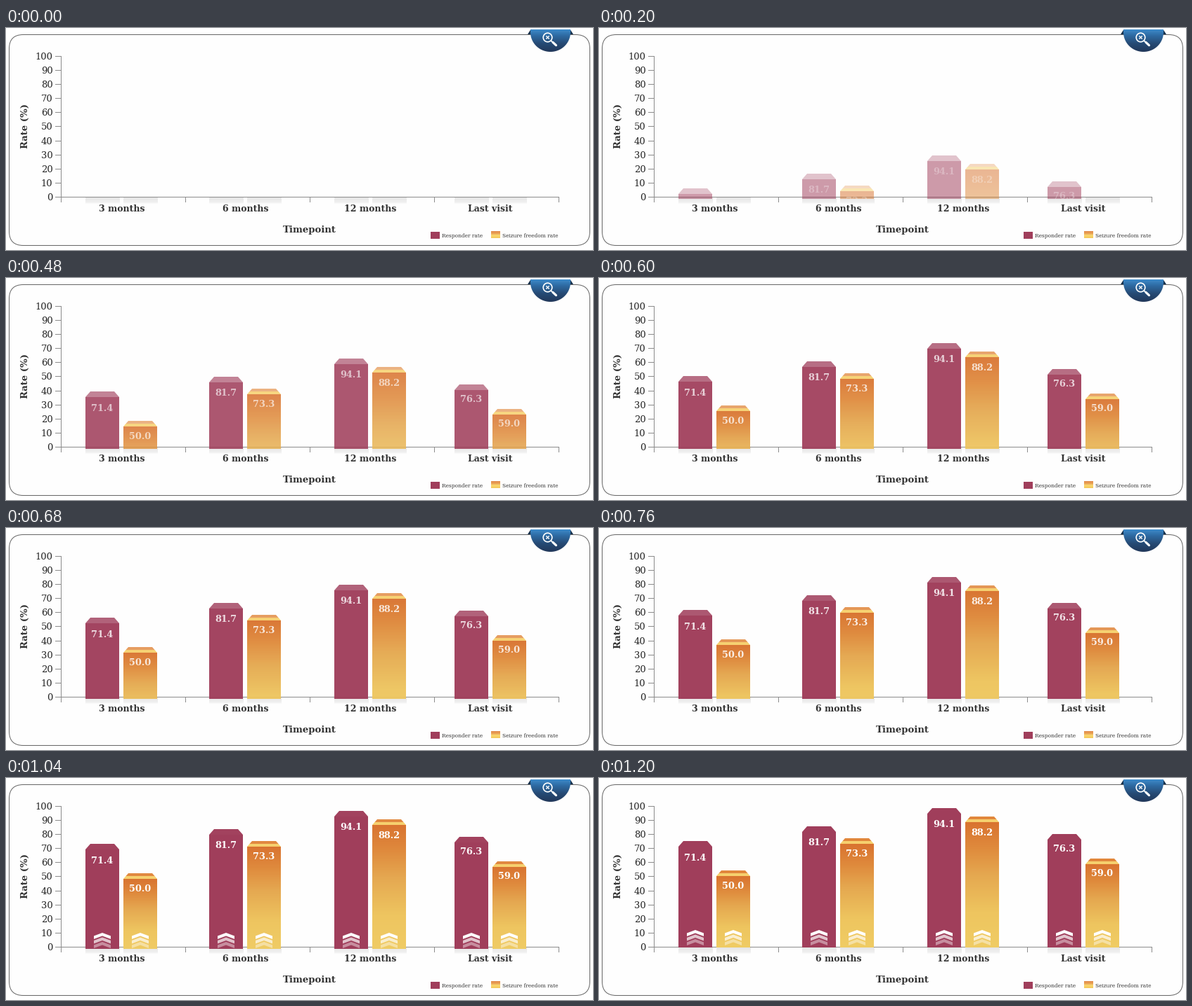
A matplotlib script for the animation above (8000 ms loop, 835 px wide and 317 px high).

```python
import numpy as np
import matplotlib.pyplot as plt
from matplotlib.animation import FuncAnimation
from matplotlib.patches import Circle, FancyBboxPatch, PathPatch, Polygon, Rectangle
from matplotlib.path import Path
from matplotlib.transforms import Affine2D

W, H, DPI = 835, 317, 100
STEP, LOOP, RISE = 40, 8000, 1200
DROP = 200          # how far below their place the bars start
FLOOR = 244         # bars are hidden below this line
BASE = 242
AXIS = 241.5
CAP = 8
BAR_W = 48

WINE = (160, 62, 91)
GOLD = [(0, (217, 115, 48)), (.2, (223, 138, 60)), (.42, (229, 168, 80)),
        (.72, (238, 197, 95)), (1, (240, 204, 100))]
LEGEND_GOLD = [(0, (226, 138, 76)), (.35, (234, 162, 84)),
               (.6, (250, 218, 112)), (1, (244, 198, 88))]
BLUE = [(0, (62, 142, 207)), (.3, (46, 106, 162)),
        (.65, (38, 74, 116)), (1, (34, 56, 90))]
INK = "#333333"
GREY = "#8c8c8c"

# left edge, cap top, label centre, label
WINE_BARS = [(113, 90, 113, "71.4"), (289, 69, 91, "81.7"),
             (467, 43, 65, "94.1"), (638, 80, 100, "76.3")]
GOLD_BARS = [(167, 132, 153, "50.0"), (343, 86, 107, "73.3"),
             (521, 55, 77, "88.2"), (692, 115, 135, "59.0")]

fig = plt.figure(figsize=(W / DPI, H / DPI), dpi=DPI, facecolor="white")
ax = fig.add_axes([0, 0, 1, 1])
ax.set_xlim(0, W)
ax.set_ylim(H, 0)
ax.axis("off")
ax.set_autoscale_on(False)

slide = Affine2D()
moving = slide + ax.transData
window = Rectangle((0, 0), W, FLOOR, transform=ax.transData)
soft, solid = [], []    # (artist, full opacity)


def rgb(c):
    return tuple(v / 255 for v in c)


def ramp(stops, n=128):
    at = np.linspace(0, 1, n)
    keys = [s[0] for s in stops]
    cols = [np.interp(at, keys, [s[1][k] for s in stops]) for k in range(3)]
    return (np.stack(cols, axis=1) / 255)[:, None, :]


def gradient(stops, x0, y0, x1, y1, z, **kw):
    return ax.imshow(ramp(stops), extent=(x0, x1, y1, y0), aspect="auto",
                     interpolation="bilinear", origin="upper", zorder=z, **kw)


def text(x, y, s, px, bold=True, color=INK, **kw):
    return ax.text(x, y, s, fontsize=px * 72 / DPI, family="DejaVu Serif",
                   weight="bold" if bold else "normal", color=color, **kw)


def line(xs, ys, color=GREY, lw=1, z=2, cap="butt"):
    ax.plot(xs, ys, color=color, lw=lw * 72 / DPI, zorder=z, snap=False,
            solid_capstyle=cap)


def rising(artist, group, alpha=1):
    artist.set_clip_path(window)
    group.append((artist, alpha))


def shape(points, color, z, group, alpha=1):
    p = Polygon(points, closed=True, fc=color, ec="none", lw=0,
                zorder=z, transform=moving)
    ax.add_patch(p)
    rising(p, group, alpha)


def cap(x, top, color, group, y0=0, y1=CAP):
    """Slice of the bevelled cap between y0 and y1 below its top."""
    a, b = (7 * (1 - y / CAP) for y in (y0, y1))
    shape([(x + a, top + y0), (x + BAR_W - a, top + y0),
           (x + BAR_W - b, top + y1), (x + b, top + y1)], color, 5, group)


def chevrons(cx):
    for k, alpha in enumerate((1, .7, .42)):
        y = 217 + 6.5 * k
        shape([(cx, y), (cx + 12, y + 4.5), (cx + 12, y + 9),
               (cx, y + 4.5), (cx - 12, y + 9), (cx - 12, y + 4.5)],
              "white", 6, soft, alpha)


def bar(x, top, label_y, label, gold):
    y = top + CAP
    if gold:
        body = gradient(GOLD, x, y, x + BAR_W, BASE, 4, transform=moving)
        rising(body, solid)
        cap(x, top, rgb((225, 135, 60)), soft, y1=4)
        cap(x, top, rgb((246, 208, 110)), solid, y0=4)
    else:
        shape([(x, y), (x + BAR_W, y), (x + BAR_W, BASE), (x, BASE)],
              rgb(WINE), 4, solid)
        cap(x, top, rgb(WINE), soft)
    cx = x + BAR_W / 2
    chevrons(cx)
    t = text(cx, label_y + 4.7, label, 12.9, color="white", ha="center",
             zorder=7, transform=moving, clip_on=True)
    rising(t, soft)


def card():
    ax.add_patch(FancyBboxPatch((4.5, 9.5), 826, 301, fc="#fefefe", ec="#666666",
                                boxstyle="round,pad=0,rounding_size=20",
                                lw=.72, zorder=0))


def badge():
    for side in (-1, 1):
        ax.add_patch(Polygon([(774.5 + side * 28, 2), (774.5 + side * 32.5, 9),
                              (774.5 + side * 27, 9)], fc="#16324f",
                             ec="none", zorder=7))
    a = np.linspace(0, np.pi, 60)
    rim = [(774.5 + 28.5 * np.cos(t), 6 + 28 * np.sin(t)) for t in a]
    outline = [(746, 2), (803, 2)] + rim + [(746, 2)]
    disc = PathPatch(Path(outline), fc="none", ec="none", transform=ax.transData)
    gradient(BLUE, 745, 2, 804, 34.5, 8).set_clip_path(disc)
    ax.add_patch(Circle((770.5, 13.5), 6.3, fc="none", ec="white",
                        lw=1.2, zorder=9))
    for s in (-1, 1):
        line([768.3, 772.7], [13.5 - 2.2 * s, 13.5 + 2.2 * s], "white", 1.4, 9)
    line([775, 778], [18, 20.5], "white", 1.8, 9)
    line([778, 782.5], [20.5, 24.7], "white", 3.2, 9, "round")


def axes_lines():
    line([78.5, 78.5], [40, 249])
    line([78, 787], [AXIS, AXIS])
    for k in range(11):
        y = round(AXIS - 20.1 * k - .5) + .5
        line([70, 78], [y, y])
        text(66.5, y + 4.6, str(10 * k), 13.1, bold=False, color="#222222",
             ha="right")
    for k in range(1, 5):
        line([78.5 + 177 * k] * 2, [AXIS, 249])
    names = ["3 months", "6 months", "12 months", "Last visit"]
    for x, name in zip((165, 340.5, 518.5, 689), names):
        text(x, 262, name, 12.5, ha="center", zorder=3)
    text(432, 292, "Timepoint", 13.2, ha="center")
    text(27.5, 140.5, "Rate (%)", 13.3, rotation=90, ha="center", va="center")


def legend():
    ax.add_patch(Rectangle((604, 291), 13, 10, fc=rgb(WINE), ec="none"))
    gradient(LEGEND_GOLD, 690, 290, 703, 300, 2)
    text(620, 299, "Responder rate", 7.55, bold=False)
    text(706, 299, "Seizure freedom rate", 7.55, bold=False)


card()
axes_lines()
legend()
badge()
for wine, gold in zip(WINE_BARS, GOLD_BARS):
    for spec, is_gold in ((wine, False), (gold, True)):
        x = spec[0]
        gradient([(0, (229, 229, 229)), (.75, (241, 241, 241)),
                  (1, (252, 252, 252))], x, 242, x + BAR_W + 1, 251, 1)
        bar(*spec, is_gold)


def update(i):
    left = max(0, 1 - i * STEP / RISE) ** 2
    # whole pixels keep the joint between cap and body closed
    slide.clear().translate(0, round(DROP * left))
    for a, full in soft:
        a.set_alpha(full * (1 - left))
    for a, full in solid:
        a.set_alpha(full * (1 - left ** 2))
    return []


anim = FuncAnimation(fig, update, frames=LOOP // STEP, interval=STEP,
                     init_func=lambda: update(0), repeat=True, repeat_delay=0)
plt.show()
```
